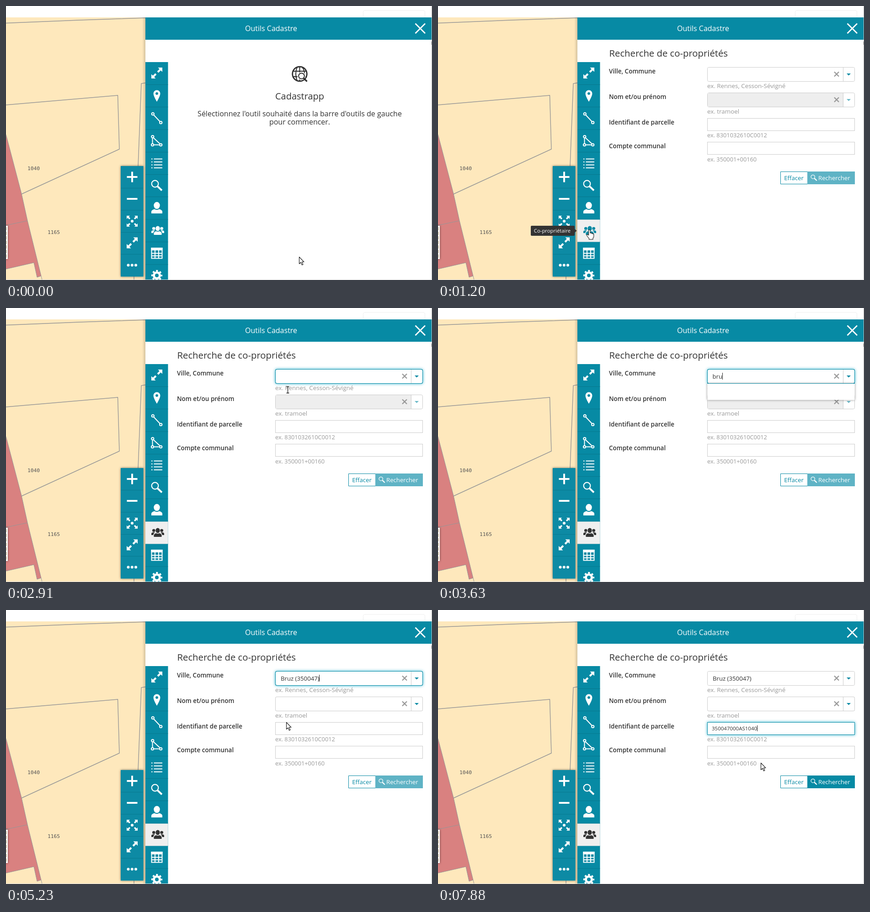
Write an HTML page that moves like this. It is 932 px wide and 601 px high and loops after 7.99 s.

```html
<!DOCTYPE html>
<html lang="fr">
<head>
<meta charset="utf-8">
<title>Outils Cadastre</title>
<style>
html, body { margin: 0; width: 100%; height: 100%; overflow: hidden; background: #fff; }
svg { display: block; width: 932px; height: 601px; }
text { font: 16px "Open Sans", Lato, sans-serif; fill: #333; }
.big { font-size: 20px; }
.mid { text-anchor: middle; }
.white { fill: #fff; }
.label { font-size: 13.5px; font-weight: 600; }
.hint { font-size: 13.4px; fill: #999; }
.code { font-size: 12.8px; }
.value { font-size: 13.2px; }
.parcel { font: 11.2px "DejaVu Sans Mono", monospace; fill: #555; }
.teal { fill: #078aa4; }
.field { fill: #fff; stroke: #ccc; }
.focus { fill: none; stroke: #078aa4; }
.glow { filter: drop-shadow(0 0 3px #35b4d0); fill: #fff; stroke: #078aa4; }
.icon { fill: none; stroke: #fff; stroke-width: 2; }

/* One loop lasts 7.99 s; states switch hard unless a keyframe eases */
.t { animation: 7.99s step-end infinite; }
#pointer { animation-name: pointer; }
#arrow { animation-name: arrow; }
#hand { animation-name: hand; }
#beam { animation-name: beam; }
#hover { animation-name: hover; }
#active, #form { animation-name: active; }
#people { animation-name: people; }
#tip { animation-name: tip; }
#welcome { animation-name: welcome; }
#cityFocus { animation-name: cityFocus; }
#cityGlow { animation-name: cityGlow; }
#cityCaret { animation-name: cityCaret; }
#typed { animation-name: typed; }
#k1 { animation-name: k1; }
#k2 { animation-name: k2; }
#k3 { animation-name: k3; }
#k4 { animation-name: k4; }
#list { animation-name: list; }
#option { animation-name: option; }
#chosen, #nameOn { animation-name: chosen; }
#idGlow { animation-name: idGlow; }
#idCaret { animation-name: idCaret; }
#pasted, #searchOn { animation-name: pasted; }

@keyframes pointer {
  0% { transform: translate(641px, 550px); }
  .876% { transform: translate(641px, 550px); animation-timing-function: steps(6, start); }
  6.258% { transform: translate(333px, 490px); }
  17.76% { transform: translate(333px, 490px); animation-timing-function: steps(9, start); }
  27.059% { transform: translate(605px, 150px); }
  35.66% { transform: translate(605px, 150px); animation-timing-function: steps(2, start); }
  37.171% { transform: translate(616.5px, 179.5px); }
  63.517% { transform: translate(616.5px, 179.5px); animation-timing-function: steps(3, start); }
  66.333% { transform: translate(613px, 246px); animation-timing-function: steps(3, start); }
  69.136% { transform: translate(622px, 268px); }
  96.683% { transform: translate(622px, 268px); animation-timing-function: steps(3, start); }
  99.499%, 100% { transform: translate(706px, 335px); }
}
@keyframes arrow {
  0% { opacity: 1 } 5.357% { opacity: 0 } 17.76% { opacity: 1 } 26.02% { opacity: 0 }
  64.45% { opacity: 1 } 67.309% { opacity: 0 } 97.622%, 100% { opacity: 1 }
}
@keyframes hand {
  0% { opacity: 0 } 5.357% { opacity: 1 } 17.76% { opacity: 0 }
  53.18% { opacity: 1 } 58.824%, 100% { opacity: 0 }
}
@keyframes beam {
  0% { opacity: 0 } 26.02% { opacity: 1 } 38.42% { opacity: 0 } 58.824% { opacity: 1 }
  64.45% { opacity: 0 } 67.309% { opacity: 1 } 97.622%, 100% { opacity: 0 }
}
@keyframes hover { 0% { opacity: 0 } 5.357% { opacity: 1 } 15.01%, 100% { opacity: 0 } }
@keyframes active { 0% { opacity: 0 } 15.01%, 100% { opacity: 1 } }
@keyframes people { 0% { color: #fff } 15.01% { color: #078aa4 } 28.78%, 100% { color: #333 } }
@keyframes tip { 0% { opacity: 0 } 6.25% { opacity: 1 } 18.8%, 100% { opacity: 0 } }
@keyframes welcome { 0% { opacity: 1 } 11.26%, 100% { opacity: 0 } }
@keyframes cityFocus { 0% { opacity: 0 } 28.78% { opacity: 1 } 72.59%, 100% { opacity: 0 } }
@keyframes cityGlow {
  0% { opacity: 0 }
  28.78% { opacity: .25; animation-timing-function: linear }
  31.9% { opacity: 1 }
  55.94% { opacity: .75; animation-timing-function: linear }
  57.7% { opacity: 0 }
  58.824% { opacity: .25; animation-timing-function: linear }
  61.7% { opacity: 1 }
  72.59% { opacity: .75; animation-timing-function: linear }
  76.471%, 100% { opacity: 0 }
}
@keyframes cityCaret {
  0% { opacity: 0; transform: none }
  28.78% { opacity: 1; transform: none }
  35.66% { opacity: 0; transform: none }
  38.42% { opacity: 1; transform: translateX(8px) }
  42.3% { opacity: 1; transform: translateX(14px) }
  44.3% { opacity: 1; transform: translateX(22px) }
  48.06% { opacity: 1; transform: translateX(28px) }
  55.94% { opacity: 0; transform: none }
  58.824% { opacity: 1; transform: translateX(85px) }
  72.59%, 100% { opacity: 0; transform: none }
}
@keyframes typed { 0% { opacity: 1 } 58.824%, 100% { opacity: 0 } }
@keyframes k1 { 0% { fill-opacity: 0 } 38.42%, 100% { fill-opacity: 1 } }
@keyframes k2 { 0% { fill-opacity: 0 } 42.3%, 100% { fill-opacity: 1 } }
@keyframes k3 { 0% { fill-opacity: 0 } 44.3%, 100% { fill-opacity: 1 } }
@keyframes k4 { 0% { fill-opacity: 0 } 48.06%, 100% { fill-opacity: 1 } }
@keyframes list { 0% { opacity: 0 } 40.42% { opacity: 1 } 58.824%, 100% { opacity: 0 } }
@keyframes option { 0% { opacity: 0 } 46.18%, 100% { opacity: 1 } }
@keyframes chosen { 0% { opacity: 0 } 58.824%, 100% { opacity: 1 } }
@keyframes pasted { 0% { opacity: 0 } 90.23%, 100% { opacity: 1 } }
@keyframes idGlow {
  0% { opacity: 0 }
  72.59% { opacity: .25; animation-timing-function: linear }
  76.471%, 100% { opacity: 1 }
}
@keyframes idCaret {
  0% { opacity: 0; transform: none }
  72.59% { opacity: 1; transform: none }
  81.22% { opacity: 0; transform: none }
  88.23% { opacity: 1; transform: none }
  90.23% { opacity: 1; transform: translateX(99px) }
  94.74% { opacity: 0; transform: translateX(99px) }
  96.74%, 100% { opacity: 1; transform: translateX(99px) }
}
</style>
</head>
<body>
<svg viewBox="0 0 932 601">
  <defs>
    <filter id="shade" x="-30%" y="-30%" width="160%" height="160%">
      <feDropShadow dx="0" dy="0" stdDeviation="2.5" flood-opacity=".5"/>
    </filter>
    <linearGradient id="edge"><stop stop-opacity="0"/><stop offset="1" stop-opacity=".16"/></linearGradient>
    <g id="expand">
      <path d="M12-12V-2.500L8.700-5.800 3.500-.6.600-3.500 5.800-8.700 2.500-12zM-12 12V2.500L-8.700 5.800-3.500.6-.6 3.500-5.800 8.700-2.500 12z" fill="#fff"/>
    </g>
    <path id="corner" d="M12-12V-5L9.700-7.300 6.300-3.900 3.900-6.300 7.300-9.700 5-12z" fill="#fff"/>
    <path id="clear" d="M-5-5L5 5M5-5L-5 5" stroke="#999" stroke-width="2.400"/>
    <path id="drop" class="teal" d="M-4.500-2H4.500L0 2.500z"/>
    <g id="combo">
      <rect class="field" x="589.500" y=".5" width="322" height="31" rx="3"/>
      <path d="M886.500 1v30" stroke="#ccc"/>
    </g>
    <g id="lens" fill="none" stroke="#fff">
      <circle cx="-4" cy="-4" r="7.300" stroke-width="2.200"/>
      <path d="M1.500 1.500L11 10.500" stroke-width="3.800"/>
    </g>
  </defs>

  <!-- Map -->
  <rect y="25" width="306" height="576" fill="#fee8bc"/>
  <path d="M0 282L34 412 47 471 77 592 68 595 61 563 0 577z" fill="#d98180"/>
  <g fill="none" stroke="#969696" stroke-width="1.400">
    <path d="M0 37.500L160 31 306 26M0 217L244.500 196 248 314 34 412.500M306 168.500L296 170 289 351M280 590V601"/>
    <path d="M0 282L34 412 47 471 79 601M0 577L61 563 68 595 77 592M0 481L47 471" stroke-width="1"/>
  </g>
  <text class="parcel" x="47" y="360">1040</text>
  <text class="parcel" x="91" y="500">1165</text>
  <rect x="-10" y="482" width="14" height="73" fill="#fff" filter="url(#shade)"/>
  <path d="M1 485V552" stroke="#d9cdb4" stroke-width="2" stroke-dasharray="7 3"/>
  <rect x="298" y="25" width="7" height="576" fill="url(#edge)"/>

  <!-- Zoom bar -->
  <rect class="teal" x="251" y="351" width="49.500" height="242.500" filter="url(#shade)"/>
  <path d="M251 399.500h49M251 448h49M251 496.500h49M251 544.500h49" stroke="#067a91"/>
  <path d="M264.500 375H287.500M276 363.500V386.500M264.500 423H287.500" stroke="#fff" stroke-width="4"/>
  <g transform="translate(276 472)">
    <use href="#corner"/><use href="#corner" transform="rotate(90)"/>
    <use href="#corner" transform="rotate(180)"/><use href="#corner" transform="rotate(270)"/>
    <circle r="3" fill="#fff"/>
  </g>
  <use href="#expand" x="276" y="519.500"/>
  <path d="M267.500 568.500h.01M275.800 568.500h.01M284 568.500h.01" stroke="#fff" stroke-width="6" stroke-linecap="round"/>

  <!-- Panel -->
  <rect x="305" y="25" width="627" height="576" fill="#fff"/>
  <rect x="781.500" y="9.500" width="135" height="24" rx="4" fill="none" stroke="#ddd" stroke-dasharray="1 1"/>
  <rect class="teal" x="305" y="25" width="627" height="49"/>
  <text class="white mid" x="580" y="55">Outils Cadastre</text>
  <path d="M895.500 38.500L917 60M917 38.500L895.500 60" stroke="#fff" stroke-width="2.800"/>
  <path d="M931.500 0V601" stroke="#bbb"/>
  <path d="M931.500 78V85" stroke="#555"/>

  <!-- Tool tabs -->
  <rect class="teal" x="305" y="123" width="49.500" height="478"/>
  <rect id="hover" class="t" x="305" y="469" width="49.500" height="49" fill="#067288"/>
  <path d="M305 172.500h49.500M305 221.500h49.500M305 271h49.500M305 320.500h49.500M305 369.500h49.500M305 418.500h49.500M305 468h49.500M305 517.500h49.500M305 567h49.500" stroke="#06788e"/>
  <rect id="active" class="t" x="305" y="468.500" width="49.500" height="49" fill="#efefef"/>
  <use href="#expand" x="330" y="147"/>
  <path d="M330 210Q322.500 197 322.500 192a7.500 7.500 0 0 1 15 0Q337.500 197 330 210zM330 189a3 3 0 1 0 .01 0z" fill="#fff" fill-rule="evenodd"/>
  <g class="icon">
    <path d="M323.200 239L336.800 253.500"/>
    <circle cx="321.300" cy="236.700" r="2.600"/><circle cx="338.700" cy="255.700" r="2.600"/>
    <path d="M320.500 289V302M323.500 304.500H335.500M322.500 289L336.500 302"/>
    <circle cx="320.800" cy="286.500" r="2.600"/><circle cx="320.500" cy="304.500" r="2.600"/><circle cx="338.700" cy="304.500" r="2.600"/>
    <path d="M318 335.500h2.500M323.500 335.500H342M318 342h2.500M323.500 342H342M318 348.500h2.500M323.500 348.500H342M318 355h2.500M323.500 355H342"/>
  </g>
  <use href="#lens" x="330" y="394"/>
  <g fill="#fff">
    <ellipse cx="330" cy="437.500" rx="6.700" ry="7.800"/>
    <path d="M318 455V451Q318 447.500 325 445.500Q330 449 335 445.500Q342 447.500 342 451V455z"/>
  </g>
  <g id="people" class="t" fill="currentColor">
    <circle cx="323.300" cy="488" r="3.300"/><circle cx="340.700" cy="488" r="3.300"/>
    <path d="M318 498V495Q318 492.500 322 492H326Q322.500 494.500 322.300 498zM346 498V495Q346 492.500 342 492H338Q341.500 494.500 341.700 498z"/>
    <ellipse cx="332" cy="488" rx="4.600" ry="5.600"/>
    <path d="M323.500 502V498.500Q323.500 495.500 328.500 494Q332 496 335.500 494Q340.500 495.500 340.500 498.500V502z"/>
  </g>
  <path class="icon" d="M318.500 531H341.500V553.500H318.500zM326 536V553M334 536V553M318 542.500H342M318 548H342" stroke-width="1.600"/>
  <path d="M317.500 530h25v6h-25z" fill="#fff"/>
  <g fill="none" stroke="#fff">
    <circle cx="330" cy="591" r="6.500" stroke-width="5"/>
    <circle cx="330" cy="591" r="10.300" stroke-width="3.600" stroke-dasharray="4.045" stroke-dashoffset="2"/>
  </g>

  <!-- Welcome -->
  <g id="welcome" class="t">
    <g fill="none" stroke="#2d2d2d" stroke-width="2">
      <circle cx="642.500" cy="149" r="15.800" stroke-width="2.800"/>
      <path d="M642.500 133V165M627 143H658M627 155H658M637 134Q631 149 637 164M648 134Q653 141 653 149"/>
      <circle cx="646.500" cy="153.500" r="7.500" fill="#fff" stroke="#fff" stroke-width="3"/>
      <circle cx="646.500" cy="153.500" r="6.300" fill="#fff"/>
      <path d="M651 158L658.500 165.500" stroke-width="3.200"/>
    </g>
    <text class="big mid" x="642.500" y="205">Cadastrapp</text>
    <text class="mid" x="642.500" y="242">Sélectionnez l'outil souhaité dans la barre d'outils de gauche</text>
    <text class="mid" x="642.500" y="260">pour commencer.</text>
  </g>

  <!-- Search form -->
  <g id="form" class="t">
    <text class="big" x="374.500" y="111" style="font-size:20.300px">Recherche de co-propriétés</text>
    <text class="label" x="374" y="148">Ville, Commune</text>
    <text class="label" x="374" y="204">Nom et/ou prénom</text>
    <text class="label" x="374" y="260">Identifiant de parcelle</text>
    <text class="label" x="374" y="312">Compte communal</text>
    <text class="hint" x="589" y="180">ex. Rennes, Cesson-Sévigné</text>
    <text class="hint" x="589" y="236">ex. tramoel</text>
    <text class="hint code" x="589" y="288">ex. 8301032610C0012</text>
    <text class="hint code" x="589" y="341">ex. 350001+00160</text>

    <use href="#combo" y="134"/>
    <rect id="cityGlow" class="t glow" x="589.500" y="134.500" width="322" height="31" rx="3"/>
    <path d="M886.500 135v30" stroke="#ccc"/>
    <rect id="cityFocus" class="t focus" x="589.500" y="134.500" width="322" height="31" rx="3"/>
    <use href="#clear" x="872" y="149.500"/>
    <use href="#drop" x="898.500" y="150"/>
    <text id="typed" class="t value" x="600.500" y="154.500"><tspan id="k1" class="t">b</tspan><tspan id="k2" class="t">r</tspan><tspan id="k3" class="t">u</tspan><tspan id="k4" class="t">z</tspan></text>
    <text id="chosen" class="t value" x="601" y="154.500">Bruz (350047)</text>
    <path id="cityCaret" class="t" d="M600.500 142V157" stroke="#222"/>

    <use href="#combo" y="190"/>
    <path d="M590 191H886V221H590z" fill="#eee"/>
    <use href="#drop" x="898.500" y="206" opacity=".6"/>
    <g id="nameOn" class="t">
      <path d="M590 191H886V221H590z" fill="#fff"/>
      <use href="#combo" y="190"/>
      <use href="#drop" x="898.500" y="206"/>
    </g>
    <use href="#clear" x="872" y="205.500"/>

    <rect class="field" x="589.500" y="246.500" width="322" height="27"/>
    <rect id="idGlow" class="t glow" x="589.500" y="246.500" width="322" height="27"/>
    <text id="pasted" class="t" x="599" y="264" style="font-size:11.500px">350047000AS1040</text>
    <path id="idCaret" class="t" d="M599.500 253V266" stroke="#222"/>
    <rect class="field" x="589.500" y="298.500" width="322" height="27"/>

    <path d="M749.500 363.500H808.500V390.500H749.500z" fill="#fff" stroke="#078aa4"/>
    <text class="value mid" x="778.500" y="382" style="fill:#078aa4">Effacer</text>
    <path d="M808 363H912V391H808z" fill="#5fb3c5"/>
    <path id="searchOn" class="t teal" d="M808 363H912V391H808z"/>
    <use href="#lens" transform="translate(822.500 377) scale(.57)"/>
    <text x="832" y="382" class="value" style="fill:#fff">Rechercher</text>

    <g id="list" class="t">
      <path d="M589.500 166H911.500V201.500H589.500z" fill="#fff" filter="url(#shade)"/>
      <path d="M589 165.500H912" stroke="#078aa4"/>
      <g id="option" class="t">
        <rect class="teal" x="591.500" y="174" width="317.500" height="20.500" rx="1"/>
        <text class="value" x="602" y="189" style="fill:#fff">Bruz (350047)</text>
      </g>
    </g>
  </g>

  <!-- Tooltip -->
  <g id="tip" class="t">
    <path d="M205 482H297Q299 482 299 484V489L303.500 493 299 497V502Q299 504 297 504H205Q203 504 203 502V484Q203 482 205 482z" fill="#333"/>
    <text class="mid" x="250" y="497" style="font-size:11.300px;fill:#fff">Co-propriétaire</text>
  </g>
  <path d="M0 600.500H932" stroke="#ddd"/>

  <!-- Mouse pointer -->
  <g id="pointer" class="t" fill="#fff" stroke="#111" stroke-width="1.100" stroke-linejoin="round">
    <path id="arrow" class="t" d="M.5.5V15.500L4 12.300 6.500 18 8.900 17 6.500 11.300H11z"/>
    <path id="hand" class="t" transform="translate(-1.500 0)" d="M-2 2.500a1.800 1.800 0 0 1 3.600 0V8q1.800-.8 3 .8q1.600-.6 2.600.8q2-.2 2 2V15q0 2.500-1.800 4.500V22H-1V20L-5.500 14q-1.200-2 0-2.800 1.500-.6 3.500 1.600z"/>
    <g id="beam" class="t" fill="none">
      <path d="M-3-7H-1Q0-7 0-6Q0-7 1-7H3M0-6V6M-3 7H-1Q0 7 0 6Q0 7 1 7H3" stroke="#fff" stroke-width="2.600"/>
      <path d="M-3-7H-1Q0-7 0-6Q0-7 1-7H3M0-6V6M-3 7H-1Q0 7 0 6Q0 7 1 7H3" stroke-width="1.300"/>
    </g>
  </g>
</svg>
</body>
</html>
```
